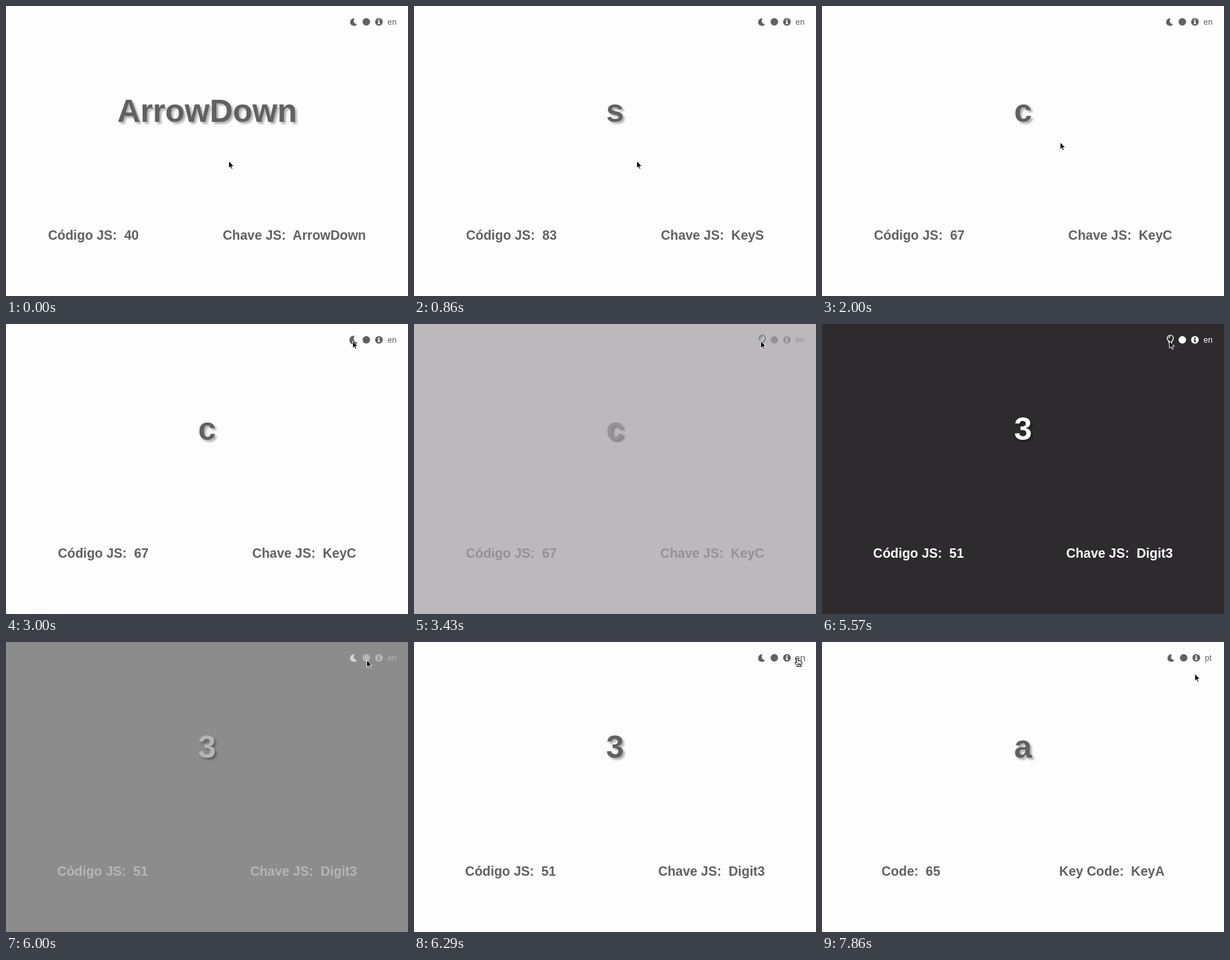
Recreate the animation shown at these times as an HTML page. Size 600 px wide and 433 px high, loop 8 s.

```html
<!DOCTYPE html>
<html lang="pt">
<head>
<meta charset="utf-8">
<title>Key codes</title>
<style>
  html, body { margin: 0; width: 100%; height: 100%; overflow: hidden; }
  body { position: relative; background: var(--bg); color: var(--fg);
    font-family: "Liberation Sans", Arial, Helvetica, sans-serif; }
  #key { position: absolute; top: 130px; width: 600px; text-align: center;
    font: bold 47.8px/53px "Liberation Sans", Arial, Helvetica, sans-serif;
    text-shadow: 3px 3px 3px rgba(0, 0, 0, .3); }
  #row { position: absolute; top: 332px; width: 600px; display: flex; justify-content: space-around;
    font-weight: bold; font-size: 19.5px; line-height: 20px; white-space: pre; }
  svg { position: absolute; left: 0; top: 0; }
  .fg { fill: var(--fg); }
  .bg { fill: var(--bg); }
</style>
</head>
<body>
<div id="key"></div>
<div id="row"><span id="code"></span><span id="name"></span></div>
<svg width="600" height="433" viewBox="0 0 600 433">
  <g id="icons">
    <g id="theme">
      <path id="moon" fill="var(--icon)" d="M520.5 18.6A5.6 5.6 0 1 0 524 27A4.9 4.9 0 0 1 520.5 18.6Z"/>
      <path id="bulb" fill="none" stroke="var(--icon)" stroke-width="1.1"
        d="M518 26.5C518 24.6 516 24 516 21.6A3.8 3.8 0 0 1 523.6 21.6C523.6 24 521.6 24.6 521.6 26.5ZM518 28.5H521.6M517.9 21.4Q518 19.8 519.6 19.6"/>
    </g>
    <circle class="fg" cx="537.8" cy="23.6" r="5.6"/>
    <circle class="fg" cx="556.6" cy="23.6" r="5.7"/>
    <circle class="bg" cx="556.6" cy="20.9" r="1.1"/>
    <path class="bg" d="M554.9 22.6H557.5V25.6H558.3V26.9H554.9V25.6H555.7V23.9H554.9Z"/>
    <text id="lang" class="fg" x="569.5" y="28" font-size="12"></text>
  </g>
  <g id="cursor" stroke-linejoin="round">
    <path id="arrow" stroke="#fff" stroke-width=".9" d="M.4 .6V11.2L2.9 8.9L4.6 12.8L6.4 12L4.7 8.2H8.2Z"/>
    <path id="hand" fill="#fff" stroke="#000" stroke-width="1"
      d="M-1.4 1.2Q0 -.9 1.2 1.2L2 4.6Q3.2 3.8 4 5Q5.2 4.3 5.9 5.6Q7.2 5.2 7.4 6.8Q7.7 9.6 6.2 11.2V13H-.2V11.6L-3 7.6Q-3.2 6 -1.6 6.4L-.3 7.6Z
         M1.6 8.4V11.2M3.2 8.4V11.2M4.8 8.4V11.2"/>
  </g>
</svg>
<script>
const FPS = 7, FRAMES = 56;
const $ = id => document.getElementById(id);

// start frame, character, code, key name
const keys = [
  [0, "ArrowDown", 40, "ArrowDown"],
  [2, "ArrowRight", 39, "ArrowRight"],
  [4, "a", 65, "KeyA"],
  [6, "s", 83, "KeyS"],
  [9, "d", 68, "KeyD"],
  [11, "c", 67, "KeyC"],
  [32, "d", 68, "KeyD"],
  [33, "a", 65, "KeyA"],
  [35, "1", 49, "Digit1"],
  [37, "2", 50, "Digit2"],
  [39, "3", 51, "Digit3"],
  [55, "a", 65, "KeyA"]
];

// frame, x, y of the pointer tip
const path = [
  [0, 332, 231], [13, 332, 231], [14, 355, 203], [16, 418, 128], [18, 498, 48],
  [19, 520, 27], [21, 517, 25], [34, 517, 25], [36, 518, 25], [41, 518, 25],
  [43, 558, 28], [44, 571.7, 23.6], [49, 571.7, 23.6], [53, 557, 46], [54, 557, 46], [55, 556, 47]
];

const smooth = (n, start, length) => {
  const x = Math.min(1, Math.max(0, (n - start) / length));
  return x * x * (3 - 2 * x);
};
const mix = (a, b, k) => `rgb(${a.map((v, i) => Math.round(v + (b[i] - v) * k))})`;
const show = (id, on) => $(id).style.display = on ? "" : "none";
const grow = (id, on, x, y) => $(id).setAttribute("transform",
  on ? `translate(${x} ${y}) scale(1.2) translate(${-x} ${-y})` : "");

function pointerAt(n) {
  const i = Math.max(1, path.findIndex(p => p[0] >= n));
  const [a, x0, y0] = path[i - 1], [b, x1, y1] = path[i];
  const k = (n - a) / (b - a);
  return [x0 + (x1 - x0) * k, y0 + (y1 - y0) * k];
}

function draw(n) {
  const dark = smooth(n, 22.54, 3.85) - smooth(n, 40.2, 3.8);
  const icon = smooth(n, 22.9, 6) - smooth(n, 41, 3);
  const css = document.body.style;
  const ink = [97, 96, 98], white = [254, 254, 254];
  css.setProperty("--bg", mix([254, 253, 254], [45, 43, 45], dark));
  css.setProperty("--fg", mix(ink, white, dark));
  css.setProperty("--icon", mix(ink, white, icon));

  const english = n >= 48;
  const [, char, code, name] = keys.filter(k => k[0] <= n).pop();
  $("key").textContent = char;
  $("code").textContent = `${english ? "Code" : "Código JS"}:  ${code}`;
  $("name").textContent = `${english ? "Key Code" : "Chave JS"}:  ${name}`;

  const bulb = n >= 23 && n < 41;
  const onLang = n >= 44 && n < 50;
  show("bulb", bulb);
  show("moon", !bulb);
  $("lang").textContent = english ? "pt" : "en";
  $("icons").setAttribute("transform", `translate(${english ? 2 : 0} 0)`);
  grow("theme", n >= 19 && n < 42, 519.5, 23.8);
  grow("lang", onLang, 576.3, 25);

  show("hand", onLang);
  show("arrow", !onLang);
  $("cursor").setAttribute("transform", `translate(${pointerAt(n)})`);
}

let last = -1;
function tick(now) {
  const n = Math.floor(now * FPS / 1000 + .05) % FRAMES;
  if (n !== last) draw(last = n);
  requestAnimationFrame(tick);
}
draw(0);
requestAnimationFrame(tick);
</script>
</body>
</html>
```
